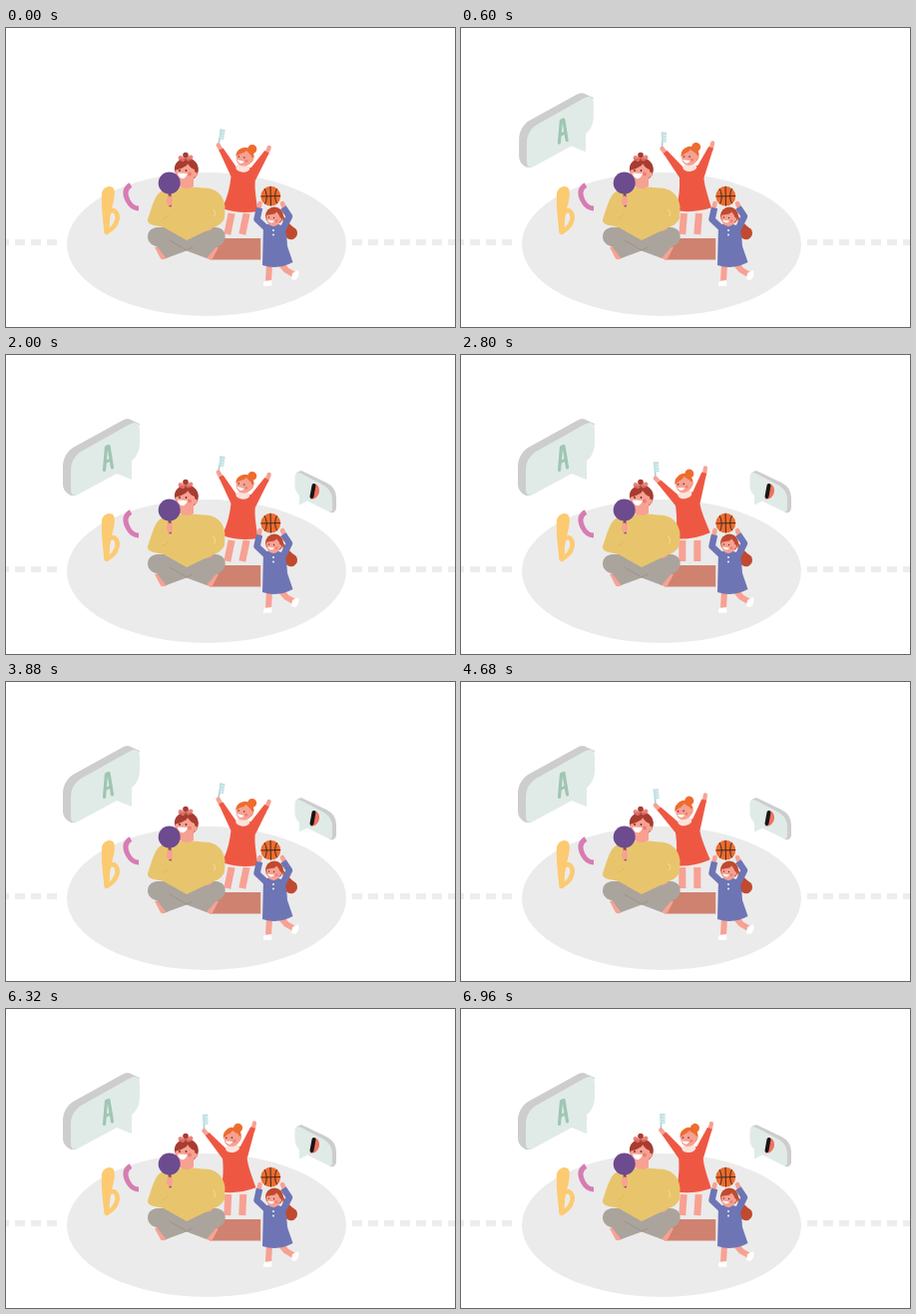
An HTML page with a canvas for the animation above (7 s loop, 450 px wide and 300 px high).

```html
<!DOCTYPE html>
<html lang="en">
<head>
<meta charset="utf-8">
<title>Family playing</title>
<style>
html, body { margin: 0; width: 100%; height: 100%; overflow: hidden; background: #fff; }
canvas { display: block; width: 450px; height: 300px; }
</style>
</head>
<body>
<canvas id="stage"></canvas>
<script>
const LOOP = 7000, STEP = 40;
const canvas = document.getElementById('stage');
const ctx = canvas.getContext('2d');
const dpr = window.devicePixelRatio || 1;
canvas.width = 450 * dpr;
canvas.height = 300 * dpr;

const SKIN = '#f7a193', RED = '#ee5843', YELLOW = '#e8c56c', GREY = '#aaa49d';
const BLUE = '#6d75b5', PLUM = '#6c4b8f', MINT = '#e0ebe8', SIDE = '#cdcdcd';
const AUBURN = '#a83c31', ORANGE = '#ee6c2f', RUST = '#bf4a30', FLOOR = '#ebebeb';

function fill(d, color) {
  ctx.fillStyle = color;
  ctx.fill(new Path2D(d));
}

function line(d, color, width, cap = 'round') {
  ctx.strokeStyle = color;
  ctx.lineWidth = width;
  ctx.lineCap = cap;
  ctx.lineJoin = 'round';
  ctx.stroke(new Path2D(d));
}

function oval(x, y, rx, ry, color, turn = 0) {
  ctx.fillStyle = color;
  ctx.beginPath();
  ctx.ellipse(x, y, rx, ry, turn, 0, Math.PI * 2);
  ctx.fill();
}

const dot = (x, y, r, color) => oval(x, y, r, r, color);

function scaled(x, y, s, draw) {
  if (s <= 0) return;
  ctx.save();
  ctx.translate(x, y);
  ctx.scale(s, s);
  ctx.translate(-x, -y);
  draw();
  ctx.restore();
}

// Springy growth from 0 to 1
function pop(t) {
  return t <= 0 ? 0 : 1 - Math.exp(-0.006 * t) * Math.cos(0.0112 * t);
}

// 0 = leaning right, 1 = leaning left
function sway(t) {
  return (1 + Math.cos((t - 995) / 1870 * Math.PI * 2)) / 2;
}

function ground() {
  ctx.fillStyle = '#ededed';
  for (let x = -7; x < 50; x += 16) ctx.fillRect(x, 212, 10, 6);
  for (let x = 347; x < 450; x += 16) ctx.fillRect(x, 212, 10, 6);
  oval(201, 217, 140, 72, FLOOR);
}

function letters() {
  const gold = '#fcca70';
  fill('M96 165 C98 159 104 157.5 107.500 160.500 C110 164 108.500 173 106 181 L104 192 L103.500 206 Q101 208.500 98.500 206 C97.500 194 95 178 96 165 Z', gold);
  line('M104 184 C109 181 112.500 186 111.500 192 C110 199 105 203 101 204', gold, 4.6);
  line('M125 157.500 C119 161 119 167 122 173 C125 179 129 181 133 181', '#d77cb3', 5, 'butt');
}

function leftBubble() {
  fill('M57 112 C57 104 61 97 67 93 L116 66 Q122 62 127 66 L134 69 L124 90 L80 126 L70 141 L65 141 Q57 137 57 130 Z', SIDE);
  fill('M65 116 C65 107 69 101 75 97 L123 70 C130 66 134 68 134 75 L134 88 C134 96 131 102 126 106 L126 125 L111 119 L74 139 C68 142 65 141 65 135 Z', MINT);
  line('M98.500 115.500 L100.500 92.500 L103 91.500 L106.500 113', '#9fc6b2', 3.2);
  line('M99.500 107.500 L105 105', '#9fc6b2', 3);
}

function rightBubble() {
  fill('M291 118 L296 116 L321 128 Q331 133 331 143 L331 154 Q330 159 325 158 Z', SIDE);
  fill('M289.500 123 C289.500 118 292 117 296 119 L317 130 C323 133 327 138 327 145 L327 154 C327 158 325 158 321 156 L302 146.500 L294 150.500 L294 141 C291 138 289.500 135 289.500 131 Z', MINT);
  fill('M308 129 C313 129.500 315 134 313.500 139 Q311 145.500 305 144.500 Z', '#f0705f');
  line('M308.500 131 L306.500 142', '#181615', 4);
}

function stool() {
  ctx.fillStyle = '#cf8270';
  ctx.fillRect(204, 211, 51.500, 21.500);
  ctx.fillStyle = '#f4eae5';
  ctx.fillRect(255.500, 211, 1.500, 21.500);
}

function redGirl(k) {
  const lean = 5 * (1 - k);
  for (const x of [221.8, 236.8]) {
    line(`M${x + lean} 183 L${x} 207`, SKIN, 7, 'butt');
    line(`M${x + lean} 181 L${x + lean * 0.85} 186`, '#fbe5df', 8, 'butt');
  }
  ctx.save();
  ctx.translate(228.5, 192);
  ctx.rotate(-0.255 * k);
  ctx.translate(-228.5, -192);

  line('M213 118 L216 102', '#a9d3d6', 1.7);
  fill('M214.500 101.500 L220 102 L218.300 112 L214 111.500 Z', '#c3e0e2');
  for (let i = 0; i < 3; i++) {
    const y = 104.4 + i * 2.6, x = 216.3 - i * 0.4;
    line(`M${x} ${y} L${x + 3.3} ${y + 0.5}`, '#eef7f7', 0.7, 'butt');
  }
  line('M216 123 L213 117.500', SKIN, 4.4);
  line('M261.500 126 L264 120', SKIN, 4.2);
  fill('M213.500 122.500 L217.800 120.500 L232 141 L227 152 Z', RED);
  fill('M259.500 123 L263.800 125.500 L250 153 L245 141 Z', RED);
  fill('M229 141 Q238 137 248 141 L250 152 C249 159 250 166 252.500 184 Q234 187 216.500 181 C221 172 224 163 225.500 150 Z', RED);
  oval(237.500, 140.500, 7, 4.2, '#fbe3dc', 0.08);
  dot(247, 121.500, 4.5, ORANGE);
  dot(240, 128.500, 8.800, ORANGE);
  fill('M231 127 Q238 125 241 123 L246 128 Q248.500 135 242 138 Q233.500 140.500 231 133 Z', SKIN);
  fill('M230.500 128.500 Q231 120.500 240 120.500 Q242 125 235 126 Z', ORANGE);
  dot(246.500, 131.500, 1.8, SKIN);
  fill('M231.500 132 L239 134 Q235 139 231.500 132 Z', '#fff');
  dot(233.500, 129, 0.8, '#733328');
  dot(239, 130, 0.8, '#733328');
  dot(241, 133.500, 1.5, '#ef8072');
  ctx.restore();
}

function parent() {
  fill('M149 220 L160 218 L162.500 230 Q158 233.500 155 231.500 Z', SKIN);
  fill('M213 220 L202 218 L199.500 230 Q204 233.500 207 231.500 Z', SKIN);
  fill('M151 200 L211 200 C218 201 220.500 206 219.500 211 C218.500 216 215 218 210.500 220 L201 231 L181 223.500 L160.500 231 L151.500 219.500 C146 218 142.500 215 142 210 C142 204 145 201 151 200 Z', GREY);
  line('M164 213 L181 223 L187 220', '#979089', 0.8);
  oval(202, 201, 5, 2.7, SKIN, -0.2);

  fill('M166 162 Q180 158 197 160.500 C210 160 218 167 219.500 179 L219 191 Q216 198 206 201 L181 213 L158 200 C148 198 141 197 142 192 C145 184 147 174 152 167 Q157 161 166 162 Z', YELLOW);
  line('M208 182 Q211 185 209 189', '#f3daa0', 1);
  line('M157 191 Q161 191 163 187', '#dcb75b', 0.8);
  fill('M174 150 L188 150 L188 159 Q181 163 174 159 Z', SKIN);

  dot(181, 142, 11.800, AUBURN);
  fill('M170 141 Q178 140 182 136 Q185 141 189 142 Q191 152 184 155 Q173 159 170 147 Z', SKIN);
  dot(189.500, 147, 2.4, SKIN);
  fill('M169 143 Q168 133 179 131 Q184 133 181 138 Q175 142 169 143 Z', AUBURN);
  oval(176, 131, 3.6, 2.4, '#e9847c', 0.5);
  oval(184, 130.500, 3.6, 2.4, '#e9847c', -0.5);
  dot(180, 127.500, 2.8, AUBURN);
  line('M174 132 L186 132', '#c9534b', 1.2);
  fill('M172 145.500 L182 146 Q180 152 176 151 Q173 150 172 145.500 Z', '#fff');
  dot(174, 143, 0.9, '#612b28');
  dot(180.500, 143, 0.9, '#612b28');
  dot(184, 146.500, 2, '#ed7d70');

  line('M164 164 L164.500 178', '#8a4b5d', 3);
  oval(164, 173.500, 3, 5, SKIN);
  dot(163.700, 155.500, 11, PLUM);
}

function blueGirl() {
  fill('M277 187 Q282 196 291 202 Q294 208 288 212 Q282 213 279 208 Z', RUST);
  line('M264 237 L263 254', SKIN, 6, 'butt');
  line('M275 236 L281 243 L288 247', SKIN, 6, 'butt');
  fill('M259 254 L266 253 L266.500 258.500 L258 259 Q257 256 259 254 Z', '#fff');
  fill('M287 246 L293 243 Q295 249 290 253 L286 252 Z', '#fff');
  line('M253 183 L254.500 176', SKIN, 4.5);
  line('M280 183 L277 176', SKIN, 4.5);
  line('M262 202 L251.500 192 L254 180.500', BLUE, 6.5, 'butt');
  line('M276 205 L284 189 L278 180', BLUE, 6.5, 'butt');
  fill('M258 198 Q268 194 279 199 Q282 209 282 219 L287.500 235 Q273 243 257 238 Z', BLUE);
  dot(269, 188.500, 9, RUST);
  fill('M261 187 Q267 187 270 183 Q274 187 275 191 Q275 197 269 199 Q261 200 261 187 Z', SKIN);
  dot(274.500, 192, 1.7, SKIN);
  fill('M260.500 188 Q261 180.500 270 180 Q273 184 269 186.500 Z', RUST);
  fill('M262 192.500 L269 193.500 Q266 198 262 192.500 Z', '#fff');
  dot(263.500, 190, 0.7, '#672d27');
  dot(268.500, 190.500, 0.7, '#672d27');
  dot(271, 193.500, 1.5, '#ef8072');
  dot(268, 203, 0.9, '#fff');
  dot(268, 207.500, 0.9, '#fff');
}

function ball() {
  dot(265.300, 168.700, 9.900, ORANGE);
  ctx.save();
  ctx.beginPath();
  ctx.arc(265.3, 168.7, 9.9, 0, Math.PI * 2);
  ctx.clip();
  line('M255 169 L276 168.500 M265 158 L265.500 179 M258.500 160 Q264 169 259 178 M272 160 Q267 169 272 177', '#33231f', 0.9);
  ctx.restore();
}

function draw(t) {
  ctx.setTransform(dpr, 0, 0, dpr, 0, 0);
  ctx.fillStyle = '#fff';
  ctx.fillRect(0, 0, 450, 300);
  ground();
  letters();
  scaled(95.5, 103, pop(t - 20), leftBubble);
  scaled(310, 137, pop(t - 665), rightBubble);
  stool();
  redGirl(sway(t));
  parent();
  blueGirl();
  ball();
}

const start = performance.now();
function tick() {
  const t = (performance.now() - start) % LOOP;
  draw(Math.floor(t / STEP) * STEP);
  requestAnimationFrame(tick);
}
tick();
</script>
</body>
</html>
```
